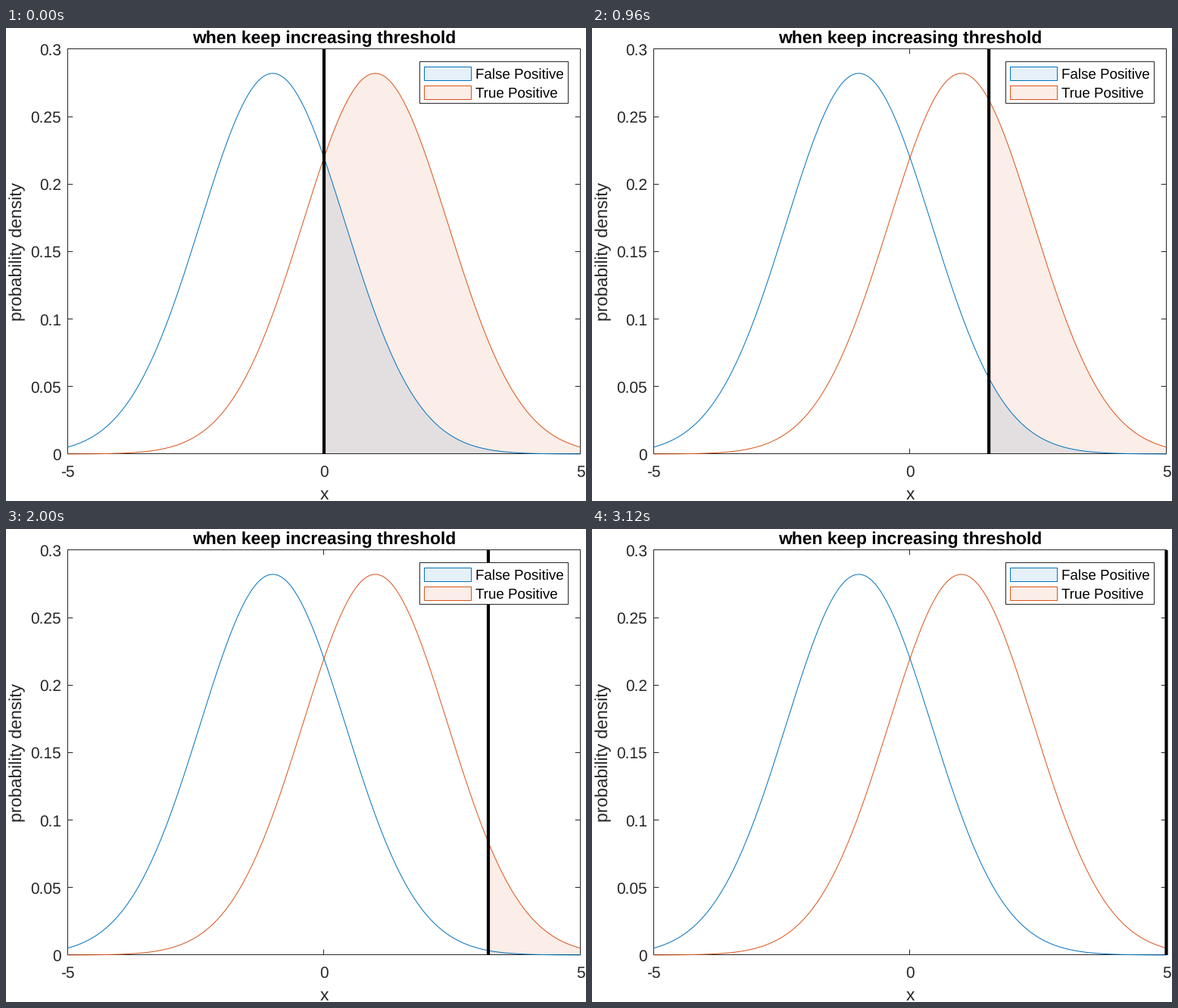
Recreate the animation shown at these times as a matplotlib script. Size 766 by 625 pixels, loop 3200 ms.

```python
import math

import numpy as np
import matplotlib.pyplot as plt
from matplotlib.animation import FuncAnimation
from matplotlib.patches import Polygon, Rectangle

plt.rcParams.update({"font.family": "Liberation Sans",
                     "path.snap": False, "text.hinting": "none"})

W, H, DPI = 766, 625, 100
FRAMES, STEP = 40, 80
LEFT, RIGHT, TOP, BOTTOM = 81.5, 758.5, 28, 563
BLUE, ORANGE, DARK = "#0072bd", "#d95319", "#262626"
ALPHA = 0.1
PT = 72 / DPI  # points per pixel
THIN, THICK = PT, 4.17 * PT
TICK, LABEL, SMALL = 20.83 * PT, 22.92 * PT, 18.75 * PT


def px(x):
    return LEFT + (np.asarray(x) + 5) * (RIGHT - LEFT) / 10


def py(p):
    return BOTTOM - np.asarray(p) * (BOTTOM - TOP) / 0.3


def crisp(v):
    """Centre of the pixel that holds v."""
    return math.ceil(v) - 0.5


def density(x, mean):
    """Normal density with variance 2."""
    return np.exp(-(x - mean) ** 2 / 4) / np.sqrt(4 * np.pi)


fig = plt.figure(figsize=(W / DPI, H / DPI), dpi=DPI, facecolor="white")
ax = fig.add_axes([0, 0, 1, 1])
ax.set_xlim(0, W)
ax.set_ylim(H, 0)
ax.axis("off")


def line(xs, ys, color=DARK, width=THIN, z=3):
    return ax.plot(xs, ys, color=color, lw=width, zorder=z,
                   solid_capstyle="butt")[0]


def frame(x, y, w, h, color=DARK, z=3, fill="none"):
    ax.add_patch(Rectangle((x, y), w, h, fc=fill, ec=color, lw=THIN, zorder=z))


def text(x, y, s, size, color=DARK, ha="center", **kw):
    ax.text(x, y, s, fontsize=size, color=color, ha=ha, va="baseline",
            zorder=8, **kw)


def draw_axes():
    x0, x1, y0, y1 = (crisp(v) for v in (LEFT, RIGHT, TOP, BOTTOM))
    frame(x0, y0, x1 - x0, y1 - y0)
    size = 6.8
    for v in (-5, 0, 5):
        x = crisp(float(px(v)))
        line([x, x], [y1, y1 - size])
        line([x, x], [y0, y0 + size])
        text(px(v), 592.8, f"{v}", TICK)
    for i in range(7):
        y = float(py(i * 0.05))
        line([x0, x0 + size], [crisp(y)] * 2)
        line([x1, x1 - size], [crisp(y)] * 2)
        text(73, y + 7.7, f"{i * 0.05:.2g}", TICK, ha="right")
    mid_x, mid_y = (LEFT + RIGHT) / 2, (TOP + BOTTOM) / 2
    text(mid_x, 19.8, "when keep increasing threshold", LABEL, "black",
         weight="bold")
    text(mid_x, 622.8, "x", LABEL)
    text(21, mid_y, "probability density", LABEL, rotation=90,
         rotation_mode="anchor")


def draw_legend():
    frame(546.5, 44.5, 196, 55, z=6, fill="white")
    for y, color, name in ((51.5, BLUE, "False Positive"),
                           (76.5, ORANGE, "True Positive")):
        ax.add_patch(Rectangle((552.5, y), 62, 18, fc=color, alpha=ALPHA,
                               lw=0, zorder=7))
        frame(552.5, y, 62, 18, color, z=7)
        text(620, y + 15.7, name, SMALL, "black", ha="left")


draw_axes()
draw_legend()

grid = np.linspace(-5, 5, 501)
areas = []
for mean, color in ((-1, BLUE), (1, ORANGE)):
    line(px(grid), py(density(grid, mean)), color, z=4)
    area = Polygon([(0, 0)], closed=True, fc=color, alpha=ALPHA, lw=0, zorder=1)
    ax.add_patch(area)
    areas.append((area, mean))
bar = line([], [], "black", THICK, z=5)


def update(i):
    cut = 5 * i / (FRAMES - 1)
    x = float(px(cut))
    xs = np.linspace(cut, 5, 300)
    for area, mean in areas:
        curve = np.column_stack([px(xs), py(density(xs, mean))])
        area.set_xy(np.vstack([curve, [(RIGHT, BOTTOM), (x, BOTTOM)]]))
    bar.set_data([x, x], [TOP, BOTTOM])
    return [area for area, _ in areas] + [bar]


anim = FuncAnimation(fig, update, frames=FRAMES, interval=STEP,
                     repeat=True, repeat_delay=0, blit=False)
plt.show()
```
